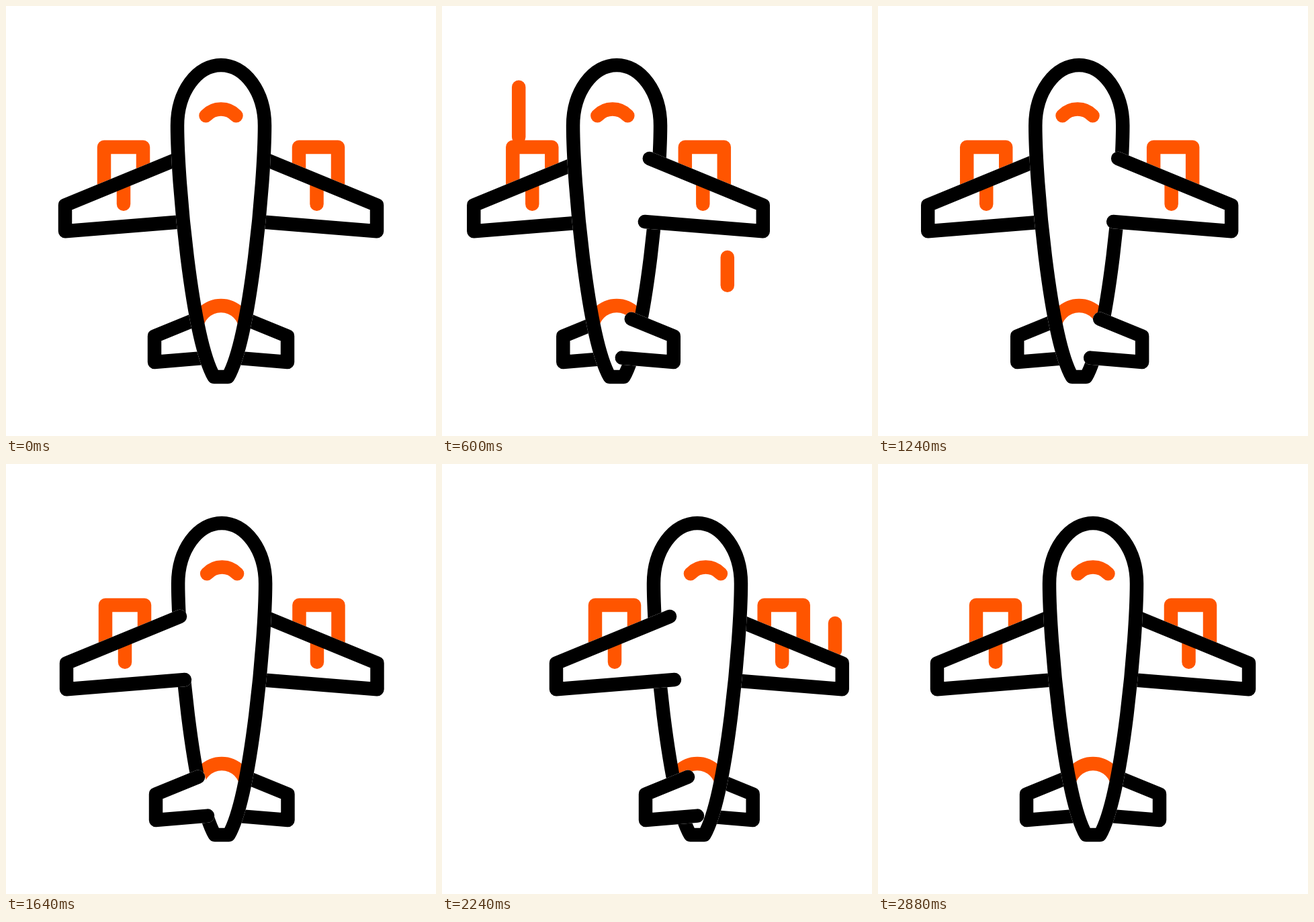
These frames come from a looping animation (640 by 640 pixels, 3000 ms). An HTML page with a canvas:

```html
<!DOCTYPE html>
<html lang="en">
<head>
<meta charset="utf-8">
<title>Plane</title>
<style>
  html, body { margin: 0; height: 100%; overflow: hidden; background: #fff; }
  canvas { display: block; }
</style>
</head>
<body>
<canvas id="stage" width="640" height="640"></canvas>
<script>
const ctx = document.getElementById('stage').getContext('2d');
const LOOP = 3000, BLACK = '#000', ORANGE = '#f50';
const NEAR = 43.7, FAR = 82; // how far the wings travel at the peak of a sway
const STREAK_LENGTH = 116, STREAK_TIME = 200;

const bodyPath = new Path2D(
  'M309.5 552C276 493 255 260 255 178A65 90 0 0 1 385 178C385 260 364 493 330.5 552Z');
const wingPath = new Path2D('M257 227L88 296.5V335.3L264 321');
const tailPath = new Path2D('M284 465.7L221 491.5V530L298 523.6');
const enginePath = new Path2D('M146 266V210H204V245');
const archPath = new Path2D('M283 483A37 37 0 0 1 357 483');
const windowPath = new Path2D('M297.5 163.2A31 31 0 0 1 342.5 163.2');

const clamp = u => Math.min(1, Math.max(0, u));
const smooth = u => u * u * (3 - 2 * u);
const smoother = u => u ** 3 * (u * (6 * u - 15) + 10);
const mix = (a, b, k) => a + (b - a) * k;

// Sway to the left and back, then to the right and back; lag delays the way out
function sway(t, leftPeak, rightPeak, lag) {
  const ease = (from, to, power) => smoother(clamp((t - from) / (to - from)) ** power);
  return leftPeak * (ease(80, 760, lag) - ease(760, 1560, 1))
    + rightPeak * (ease(1560, 2250, lag) - ease(2250, 2880, 0.6));
}

function stroke(path, color) {
  ctx.strokeStyle = color;
  ctx.stroke(path);
}

function line(x, y1, y2) {
  const path = new Path2D();
  path.moveTo(x, y1);
  path.lineTo(x, y2);
  stroke(path, ORANGE);
}

// Clears the silhouette of a path, including its outline
function cutOut(path) {
  const closed = new Path2D(path);
  closed.closePath();
  ctx.globalCompositeOperation = 'destination-out';
  ctx.fill(closed);
  ctx.stroke(closed);
  ctx.globalCompositeOperation = 'source-over';
}

function shifted(dx, draw) {
  ctx.save();
  ctx.translate(dx, 0);
  draw();
  ctx.restore();
}

function drawSide(stemX) {
  stroke(enginePath, ORANGE);
  cutOut(wingPath);
  cutOut(tailPath);
  line(stemX, 262, 294.7);
  stroke(wingPath, BLACK);
  stroke(tailPath, BLACK);
}

function drawBody() {
  cutOut(bodyPath);
  ctx.save();
  ctx.clip(bodyPath);
  stroke(archPath, ORANGE);
  ctx.restore();
  stroke(bodyPath, BLACK);
}

// A wind streak grows downwards, then shrinks into its lower end
function drawStreak(t, x, top, start) {
  const head = smooth(clamp((t - start) / STREAK_TIME));
  const tail = smooth(clamp((t - start) / STREAK_TIME - 1));
  if (head > tail) line(x, top + tail * STREAK_LENGTH, top + head * STREAK_LENGTH);
}

function render(t) {
  const left = sway(t, -NEAR, FAR, 0.9);
  const right = sway(t, -FAR, NEAR, 1.04);
  const leftSide = () => shifted(left, () => drawSide(175));
  const rightSide = () => shifted(right + 640, () => {
    ctx.scale(-1, 1);
    drawSide(177.5);
  });

  ctx.clearRect(0, 0, 640, 640);
  ctx.lineWidth = 20.48;
  ctx.lineCap = ctx.lineJoin = 'round';

  drawStreak(t, 114.2, 79, 320);
  drawStreak(t, 424.8, 374, 520);
  drawStreak(t, 233, 100, 1760);
  drawStreak(t, 585, 161, 1920);

  // The wing on the far side of the sway passes over the body
  if (left <= 0) leftSide();
  if (left >= 0) rightSide();
  shifted(mix(left, right, 0.575), drawBody);
  if (left > 0) leftSide();
  if (left < 0) rightSide();
  shifted(mix(left, right, left < 0 ? 0.76 : 0.25), () => stroke(windowPath, ORANGE));
}

function tick() {
  render(performance.now() % LOOP);
  requestAnimationFrame(tick);
}
tick();
</script>
</body>
</html>
```
